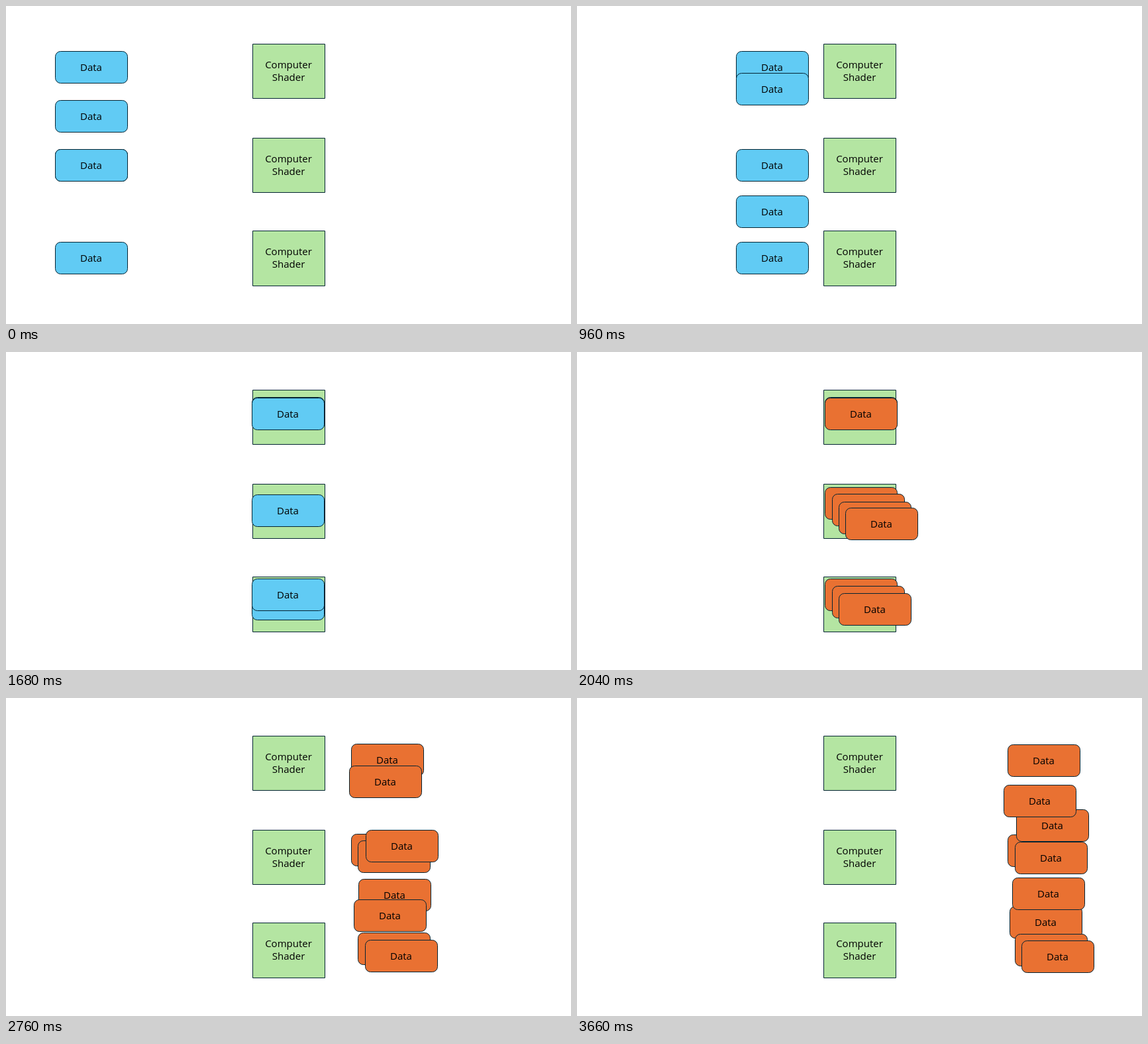
These frames come from a looping animation (853 by 480 pixels, 3720 ms). An HTML page with a canvas:

```html
<!DOCTYPE html>
<html lang="en">
<head>
<meta charset="utf-8">
<title>Data through shaders</title>
<style>
  html, body { margin: 0; width: 100%; height: 100%; overflow: hidden; background: #fff; }
  canvas { display: block; }
</style>
</head>
<body>
<canvas id="stage" width="853" height="480"></canvas>
<script>
const ctx = document.getElementById('stage').getContext('2d');
const LOOP = 3720, STEP = 60, MOVE = 1600;
const INPUT_START = 111, SWAP = 1830, OUTPUT_START = 1930;
const LEFT = 74, MIDDLE = 371.5, TRAVEL = 278.5, DRIFT = 2.3, PITCH = 10.5;
const BLUE = '#61cbf4', ORANGE = '#e97132', GREEN = '#b4e5a2', LINE = '#042433';

const shaders = [{ y: 57, h: 82 }, { y: 199, h: 82 }, { y: 339, h: 83 }];

// Inputs share one horizontal run and differ in height only.
const inputs = [[68, 68], [142, 69], [216, 215.4], [356, 355.7], [216, 342]]
  .map(([y0, y1]) => ({ x0: LEFT, y0, x1: MIDDLE, y1 }));

// Outputs leave as diagonal stacks; strays head for a place of their own.
const outputs = [
  ...stack(203.7, 4, PITCH, { 2: [653, 314], 3: [663, 168] }),
  ...stack(68, 2, 0, { 1: [644, 131] }),
  ...stack(342.7, 3, PITCH, { 0: [657, 271] })
];

function stack(top, count, pitch, strays) {
  return Array.from({ length: count }, (_, i) => {
    const x0 = MIDDLE + i * pitch, y0 = top + i * pitch;
    const [x1, y1] = strays[i] || [x0 + TRAVEL, y0 + DRIFT];
    return { x0, y0, x1, y1 };
  });
}

const clamp = v => Math.min(1, Math.max(0, v));
const ease = u => u < 0.5 ? 2 * u * u : 1 - 2 * (1 - u) ** 2;
const mix = (a, b, u) => Math.round(a + (b - a) * u);

function box(x, y, h, radius, fill) {
  ctx.beginPath();
  ctx.roundRect(x + 0.5, y + 0.5, 109, h, radius);
  ctx.fillStyle = fill;
  ctx.fill();
  ctx.stroke();
  ctx.fillStyle = '#000';
}

function drawShader({ y, h }) {
  box(372, y, h, 0, GREEN);
  ctx.fillText('Computer', 426.5, y + 37);
  ctx.fillText('Shader', 426.5, y + 56);
}

function drawData(cards, fill, progress) {
  for (const { x0, y0, x1, y1 } of cards) {
    const x = mix(x0, x1, progress), y = mix(y0, y1, progress);
    box(x, y, 48, 8, fill);
    ctx.fillText('Data', x + 54.5, y + 30);
  }
}

function draw(now) {
  const t = Math.floor(now % LOOP / STEP) * STEP;
  const progress = start => ease(clamp((t - start) / MOVE));
  ctx.fillStyle = '#fff';
  ctx.fillRect(0, 0, 853, 480);
  ctx.strokeStyle = LINE;
  ctx.font = '15px "Open Sans", "Noto Sans", sans-serif';
  ctx.textAlign = 'center';
  shaders.forEach(drawShader);
  if (t < SWAP) drawData(inputs, BLUE, progress(INPUT_START));
  else drawData(outputs, ORANGE, progress(OUTPUT_START));
  requestAnimationFrame(draw);
}
requestAnimationFrame(draw);
</script>
</body>
</html>
```
